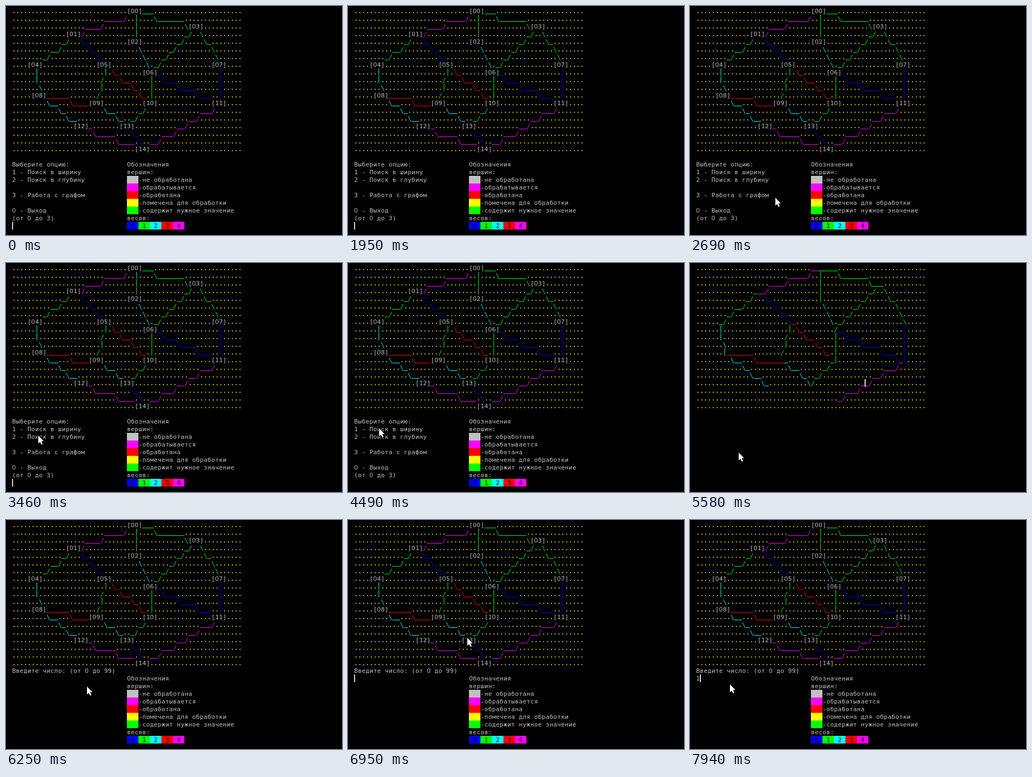
An HTML page with a canvas for the animation above (8 s loop, 614 by 418 pixels).

```html
<!DOCTYPE html>
<html lang="ru">
<head>
<meta charset="utf-8">
<title>Обход графа</title>
<style>
  html, body { margin: 0; width: 100%; height: 100%; overflow: hidden; background: #000; }
  canvas { display: block; }
</style>
</head>
<body>
<canvas id="stage" width="614" height="418"></canvas>
<script>
const LOOP = 8000, BLINK = 540, W = 614, H = 418;
const CW = 7, CH = 14, LEFT = 11, TOP = 2, COLS = 60, ROWS = 19;
const GRAY = '#c0c0c0';
const INK = { b: '#0000ff', g: '#00ff00', c: '#00ffff', r: '#ff0000', m: '#ff00ff', y: '#ffff00' };
// screen stripes: each colour channel sits a third of a pixel apart
const CHANNELS = [['#ff0000', 1 / 3], ['#00ff00', 0], ['#0000ff', -1 / 3]];

// ink, row, column, direction (1 right, -1 left, 0 straight down), one piece per row
const EDGES = String.raw`
g 0 33 1 ____ \_______ \___ \ \_ \ \ \
g 0 32 0 _ | | | |
m 0 32 -1 __ _____/ ____/ __/
g 3 16 -1 _ _/ __/ _/ _/
b 4 18 1 \_ \_ \_ \
c 5 33 1 \ \ \
g 3 47 -1 _/ _/ _/ _/ _/ /
c 8 6 0 | |
c 10 7 0 \ |
r 7 25 1 _ \_ \__ \_ \_
g 8 25 -1 | /
g 10 24 -1 | /
g 9 36 0 | | | |
b 8 37 1 __ \___ \____ \___ \
b 8 54 0 | | | | |
r 11 8 1 _______ \_______
c 12 9 1 \__ \_ \__ \_
c 12 23 1 _ \__ \_ \
g 12 36 -1 _ _/ _/ /
m 12 54 -1 _ ___/ __/ __/ ___/ _/
m 17 37 -1 _
m 15 20 1 _ \_____ \____
b 16 31 1 \_ \
`.trim().split('\n').map(line => {
  const [ink, row, col, dir, ...parts] = line.trim().split(' ');
  return { ink: INK[ink], row: +row, col: +col, dir: +dir, parts };
});
const LATE_EDGES = 3;

// column and row of nodes 00 to 14
const NODES = '30,0 14,3 30,4 46,2 4,7 22,7 34,8 52,7 5,11 20,12 34,12 52,12 16,15 28,15 32,18'
  .split(' ').map(pair => pair.split(',').map(Number));

const xOf = col => LEFT + col * CW;
const yOf = row => TOP + row * CH;

function layer(paint) {
  const canvas = document.createElement('canvas');
  canvas.width = W;
  canvas.height = H;
  const g = canvas.getContext('2d');
  g.textAlign = 'center';
  paint(g);
  return canvas;
}

function fillCells(g, col, row, count, color) {
  g.fillStyle = color;
  g.fillRect(xOf(col), yOf(row), count * CW, CH);
}

function print(g, col, row, text, color = GRAY) {
  g.fillStyle = color;
  [...text].forEach((ch, i) => {
    // the monospaced zero carries an inner mark, so a plain one is used
    g.font = ch === '0' ? '11.5px "Liberation Sans", sans-serif'
                        : '11.2px "DejaVu Sans Mono", monospace';
    g.fillText(ch, xOf(col + i) + 3.5, yOf(row) + 11);
  });
}

function shape(g, ch, x, y, dx) {
  if (ch === '_') g.fillRect(x, y + 12, CW, 1);
  else if (ch === '|') g.fillRect(x + Math.floor(3.2 + dx), y, 1, 13);
  else if (ch === '.') g.fillRect(x + 2.8 + dx, y + 9, 1.4, 2);
  else {
    const lean = ch === '/' ? 2.3 : -2.3;
    g.beginPath();
    g.moveTo(x + 3.5 + lean + dx, y + 3);
    g.lineTo(x + 3.5 - lean + dx, y + 13);
    g.stroke();
  }
}

function drawStroke(g, ch, col, row, color) {
  fillCells(g, col, row, 1, '#000');
  g.globalCompositeOperation = 'lighter';
  CHANNELS.forEach(([light, dx], i) => {
    if (color.substr(1 + 2 * i, 2) !== 'ff') return;
    g.fillStyle = g.strokeStyle = light;
    shape(g, ch, xOf(col), yOf(row), dx);
  });
  g.globalCompositeOperation = 'source-over';
}

function drawEdge(g, { ink, row, col, dir, parts }) {
  parts.forEach((part, i) => {
    const start = dir < 0 ? col - part.length : col;
    [...part].forEach((ch, k) => drawStroke(g, ch, start + k, row + i, ink));
    col += dir * part.length;
  });
}

function drawGraph(g, edgeCount, withNodes) {
  for (let r = 0; r < ROWS; r++)
    for (let c = 0; c < COLS; c++) drawStroke(g, '.', c, r, INK.y);
  EDGES.slice(0, edgeCount).forEach(edge => drawEdge(g, edge));
  if (!withNodes) return;
  NODES.forEach(([col, row], i) => {
    fillCells(g, col, row, 4, '#000');
    print(g, col, row, `[${String(i).padStart(2, '0')}]`);
  });
}

function drawLegend(g) {
  print(g, 30, 20, 'Обозначения');
  print(g, 30, 21, 'вершин:');
  [[GRAY, 'не обработана'], [INK.m, 'обрабатывается'], [INK.r, 'обработана'],
   [INK.y, 'помечена для обработки'], [INK.g, 'содержит нужное значение']]
    .forEach(([color, label], i) => {
      fillCells(g, 30, 22 + i, 3, color);
      print(g, 33, 22 + i, '-' + label);
    });
  print(g, 30, 27, 'весов:');
  [...'bgcrm'].forEach((ink, i) => {
    fillCells(g, 30 + i * 3, 28, 3, INK[ink]);
    print(g, 31 + i * 3, 28, String(i), '#000');
  });
}

function screen(firstRow, text) {
  return layer(g => {
    drawGraph(g, EDGES.length, true);
    drawLegend(g);
    text.split('\n').forEach((line, i) => print(g, 0, firstRow + i, line));
  });
}

const menu = screen(20, `Выберите опцию:
1 - Поиск в ширину
2 - Поиск в глубину

3 - Работа с графом

0 - Выход
(от 0 до 3)`);
const prompt = screen(19, 'Введите число: (от 0 до 99)');
const answered = screen(19, 'Введите число: (от 0 до 99)\n1');
const blank = layer(() => {});
const sparse = layer(g => drawGraph(g, 7, false));
const partial = layer(g => drawGraph(g, EDGES.length - LATE_EDGES, false));

// start, picture, caret column and row; the caret blinks from each start
const SCENES = [
  [-220, menu, 0, 28], [4480, menu], [5020, menu, 0, 28],
  [5520, blank], [5550, sparse], [5580, partial, 44, 15],
  [5610, prompt, 0, 20], [7730, answered, 1, 20]
];

// pointer moves: start, end, goal
const ENTRY = [363, 410];
const MOVES = [
  [2220, 3000, 20, 311], [3340, 3460, 59, 315], [3460, 4090, 132, 309],
  [4150, 4490, 57, 302], [4980, 5340, 89, 346], [6010, 6360, 174, 285],
  [6640, 6950, 218, 215], [6950, 7440, 223, 215], [7470, 7940, 73, 300]
];

function pointerAt(t) {
  if (t < MOVES[0][0]) return null;
  let [x, y] = ENTRY;
  for (const [start, end, toX, toY] of MOVES) {
    const k = Math.min(1, Math.max(0, (t - start) / (end - start)));
    x += (toX - x) * k;
    y += (toY - y) * k;
  }
  return [Math.round(x), Math.round(y)];
}

const arrow = new Path2D('M0 0V14.5L3.2 11.4 5.8 16.5 8 15.6 5.6 10.3H10Z');
const ctx = document.getElementById('stage').getContext('2d');

function render(t) {
  const [start, picture, col, row] = SCENES.filter(s => s[0] <= t).pop();
  ctx.fillStyle = '#000';
  ctx.fillRect(0, 0, W, H);
  ctx.drawImage(picture, 0, 0);
  const lit = Math.floor((t - start) / BLINK) % 2 === 0;
  if (lit && col !== undefined) {
    ctx.fillStyle = '#d4d4d4';
    ctx.fillRect(xOf(col), yOf(row), 2, CH);
  }
  const at = pointerAt(t);
  if (at) {
    ctx.save();
    ctx.translate(...at);
    ctx.strokeStyle = '#000';
    ctx.lineWidth = 2;
    ctx.stroke(arrow);
    ctx.fillStyle = '#fff';
    ctx.fill(arrow);
    ctx.restore();
  }
}

const began = performance.now();
function tick() {
  render((performance.now() - began) % LOOP);
  requestAnimationFrame(tick);
}
tick();
</script>
</body>
</html>
```
